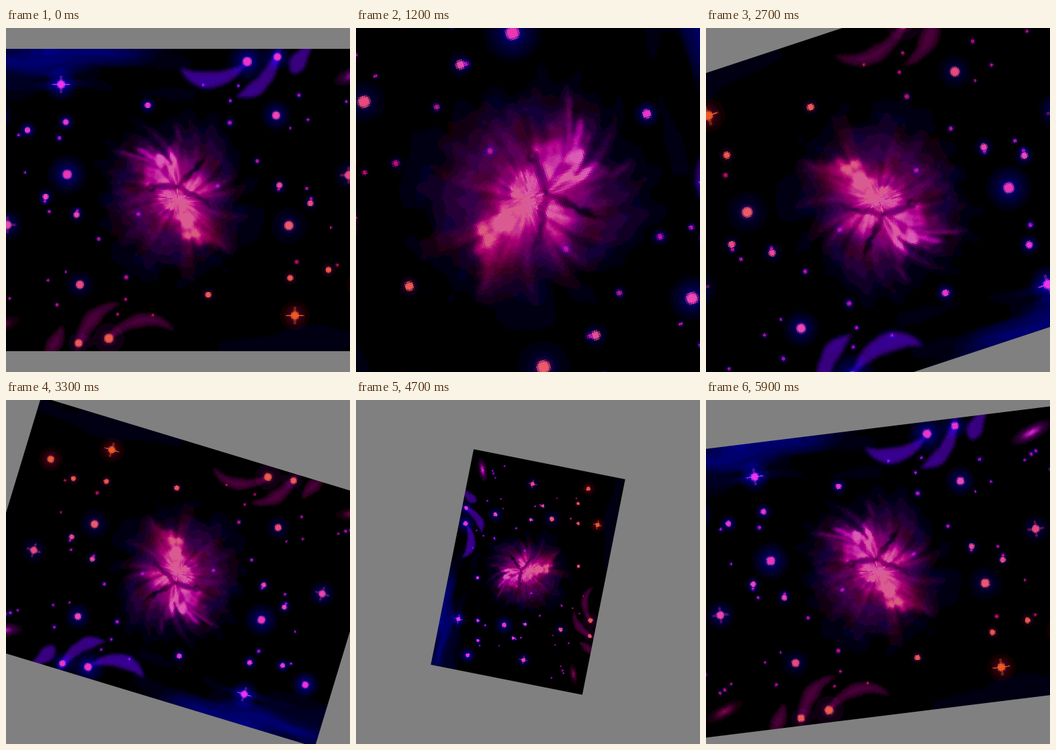
Recreate the animation shown at these times as an HTML page with a canvas. Size 512 px wide and 512 px high, loop 6 s.

```html
<!DOCTYPE html>
<html lang="en">
<head>
<meta charset="utf-8">
<title>Rotating nebula</title>
<style>
  html, body { margin: 0; width: 100%; height: 100%; overflow: hidden; background: #808080; }
  canvas { display: block; }
</style>
</head>
<body>
<canvas id="stage" width="512" height="512"></canvas>
<script>
const TAU = Math.PI * 2;
const RAD = TAU / 360;
const clamp = (v, lo = 0, hi = 1) => Math.min(hi, Math.max(lo, v));

// The sky spans 640 x 450 units around its centre, stored at half size for coarse pixels.
const sky = document.createElement('canvas');
sky.width = 320;
sky.height = 225;
const g = sky.getContext('2d', { willReadFrequently: true });

// Bright stars: x, y, radius. Every star also has a point reflection.
const BRIGHT = [
  [-174, -172, 7], [254, -37, 7], [-165, -38, 8], [146, -126, 7], [103, -206, 8],
  [148, -213, 6.5], [-272, -125, 7], [-224, -104, 5], [-167, -116, 5], [-45, -141, 5],
  [77, -115, 4], [118, -58, 3.5], [151, -22, 5], [197, 5, 5], [59, -21, 3.5]
];
const SPIKED = 2;
const FAINT = 16;

// Purple plumes on the upper edge: start, control and end point of each curve.
const PLUMES = [
  [2, -198, 46, -154, 108, -208],
  [84, -154, 136, -160, 152, -232],
  [172, -186, 176, -210, 200, -232]
];

// Three dark lanes leave one point; the bright lobes lie between them.
const JUNCTION = { x: 0, y: -20 };
const LANES = [176, 30, -47];
const blob = (x, y, a, b, deg, amp) =>
  ({ x, y, a, b, amp, c: Math.cos(deg * RAD), s: Math.sin(deg * RAD) });
const BLOBS = [
  blob(-4, -2, 82, 90, 0, .36),
  blob(8, 16, 50, 27, 46, .52),
  blob(-18, -42, 42, 26, -12, .38),
  blob(30, -18, 26, 17, 10, .42),
  blob(-6, -70, 8, 30, 8, .3),
  blob(-46, -62, 36, 7, 10, .32),
  blob(36, 57, 34, 10, 22, .34),
  ...LANES.map(deg => blob(JUNCTION.x + 24 * Math.cos(deg * RAD),
    JUNCTION.y + 24 * Math.sin(deg * RAD), 27, 4.5, deg, -.36))
];

// 0 at the violet upper left, 1 at the orange lower right.
const warmth = (x, y) => clamp(.5 + (y + x * .35) / 500);

function hash(x, y) {
  const v = Math.sin(x * 127.1 + y * 311.7) * 43758.5453;
  return v - Math.floor(v);
}

function noise(x, y) {
  const ix = Math.floor(x), iy = Math.floor(y);
  const ease = t => t * t * (3 - 2 * t);
  const u = ease(x - ix), v = ease(y - iy);
  const row = j => hash(ix, j) * (1 - u) + hash(ix + 1, j) * u;
  return row(iy) * (1 - v) + row(iy + 1) * v;
}

// Radial glow that is solid up to a share of its radius, or falls off softly.
function glow(x, y, r, rgb, alpha, solid = 0) {
  const fill = g.createRadialGradient(x, y, 0, x, y, r);
  fill.addColorStop(0, `rgba(${rgb},${alpha})`);
  fill.addColorStop(solid || .4, `rgba(${rgb},${solid ? alpha : alpha * .4})`);
  fill.addColorStop(1, `rgba(${rgb},0)`);
  g.fillStyle = fill;
  g.fillRect(x - r, y - r, 2 * r, 2 * r);
}

function drawPlume([x0, y0, cx, cy, x1, y1], side) {
  g.fillStyle = side > 0 ? '#44008c' : '#480438';
  g.beginPath();
  for (let t = 0; t <= 1; t += .01) {
    const u = 1 - t;
    const x = side * (u * u * x0 + 2 * u * t * cx + t * t * x1);
    const y = side * (u * u * y0 + 2 * u * t * cy + t * t * y1);
    const r = 12 * Math.sin(Math.PI * t) * (.6 + .6 * noise(x / 20, y / 20));
    g.moveTo(x + r, y);
    g.arc(x, y, r, 0, TAU);
  }
  g.fill();
}

function drawStar(x, y, r, spiked) {
  const k = warmth(x, y);
  const small = r < 4.5;
  const rgb = [small ? 215 : 245, small ? 30 : 55 + 50 * k, 240 - 160 * k - 40 * k ** 4].map(Math.round).join();
  const halo = [160 * k ** 4, 0, 250 * (1 - .8 * k)].map(Math.round).join();
  g.globalCompositeOperation = 'lighter';
  glow(x, y, r * r * .5 + 3, halo, .9);
  g.globalCompositeOperation = 'source-over';
  glow(x, y, r + .5, rgb, 1, small ? .3 : .6);
  if (!spiked) return;
  g.fillStyle = `rgba(${rgb},.7)`;
  g.fillRect(x - 13, y - 1, 26, 2);
  g.fillRect(x - 1, y - 13, 2, 26);
}

function drawGalaxy(side) {
  g.save();
  g.translate(side * 266, side * -188);
  g.rotate(-.38);
  g.scale(1, .36);
  glow(0, 0, 42, side > 0 ? '190,0,220' : '120,0,90', .9);
  glow(0, 0, 20, side > 0 ? '255,70,220' : '150,30,90', .8);
  g.restore();
}

function nebula(x, y) {
  const r = Math.hypot(x, y) + .01;
  const a = Math.atan2(y, x) + r * .002;
  const streak = noise(Math.cos(a) * 9 + 20 + r * .03, Math.sin(a) * 9 + 20);
  const grain = noise(x / 9 + 90, y / 9 + 90) - .5;
  const stretch = 1 + (streak - .5) * .3 * clamp(r / 90);
  const px = x / stretch + grain * 7;
  const py = y / stretch + (noise(x / 8 + 40, y / 8 + 70) - .5) * 7;
  let light = 0;
  for (const b of BLOBS) {
    const dx = px - b.x, dy = py - b.y;
    const q = ((dx * b.c + dy * b.s) / b.a) ** 2 + ((dy * b.c - dx * b.s) / b.b) ** 2;
    light += b.amp * Math.exp(-(q ** 1.5));
  }
  light = clamp(light * (1 + grain * .25 + (streak - .5) * .25));
  const red = 225 * clamp(light * 1.2);
  const green = clamp((light - .66) * 500, 0, 100);
  const haze = 60 * Math.exp(-((r / 130) ** 4)) * noise(x / 18 + 30, y / 18 + 10) * (1 - light);
  return [red, green, red * (1.1 - .8 * warmth(x, y)) + haze];
}

// Blue drifts along the upper left edge, faint along the opposite one.
function drift(x, y) {
  const side = y < 0 ? 1 : -1;
  const u = x * side, v = y * side;
  const bend = 30 * noise(u / 70 + 5, v / 40 + 9);
  const band = noise(u / 90 + 11, (v + bend) / 13 + 60);
  const fade = clamp((-v - 135) / 70) * clamp((150 - u) / 350);
  return fade * band * (side > 0 ? 170 : 40);
}

function paintSky() {
  g.fillStyle = '#000';
  g.fillRect(0, 0, sky.width, sky.height);
  g.translate(160, 112.5);
  g.scale(.5, .5);
  g.filter = 'blur(1.5px)';
  for (const side of [1, -1]) PLUMES.forEach(p => drawPlume(p, side));
  g.filter = 'none';

  // Add the gas to the plumes.
  shade((x, y) => {
    const gas = Math.hypot(x, y) < 170 ? nebula(x, y) : [0, 0, 0];
    gas[2] += drift(x, y);
    return gas;
  });

  const faint = Array.from({ length: FAINT }, (_, i) =>
    [(hash(i, 1) - .5) * 600, -hash(i, 2) * 200, 2 + hash(i, 3) * 1.5]);
  for (const side of [1, -1]) {
    drawGalaxy(side);
    [...BRIGHT, ...faint].forEach(([x, y, r], i) => drawStar(side * x, side * y, r, i < SPIKED));
  }
  shade(() => [0, 0, 0]);
}

// Adds a colour to every pixel and reduces the result to flat steps.
function shade(colourAt) {
  const image = g.getImageData(0, 0, sky.width, sky.height);
  const px = image.data;
  for (let i = 0; i < px.length; i += 4) {
    const n = i / 4;
    const add = colourAt((n % 320) * 2 - 319, Math.floor(n / 320) * 2 - 224);
    for (let c = 0; c < 3; c++) px[i + c] = Math.floor((px[i + c] + add[c]) / 18) * 18;
  }
  g.putImageData(image, 0, 0);
}

const ctx = document.getElementById('stage').getContext('2d');
const STEPS = 60;

function draw(now) {
  const step = Math.floor(now / 100) % STEPS;
  const angle = Math.floor(step / STEPS * 256) / 256 * TAU; // 256 whole steps per turn
  const zoom = 1 + .5 * Math.sin(step / STEPS * TAU);
  ctx.setTransform(1, 0, 0, 1, 0, 0);
  ctx.fillStyle = '#808080';
  ctx.fillRect(0, 0, 512, 512);
  ctx.translate(256, 256);
  ctx.rotate(angle);
  ctx.scale(zoom, zoom);
  ctx.imageSmoothingEnabled = false;
  ctx.drawImage(sky, -320, -225, 640, 450);
}

paintSky();
const start = performance.now();
function tick() {
  draw(performance.now() - start);
  requestAnimationFrame(tick);
}
tick();
</script>
</body>
</html>
```
